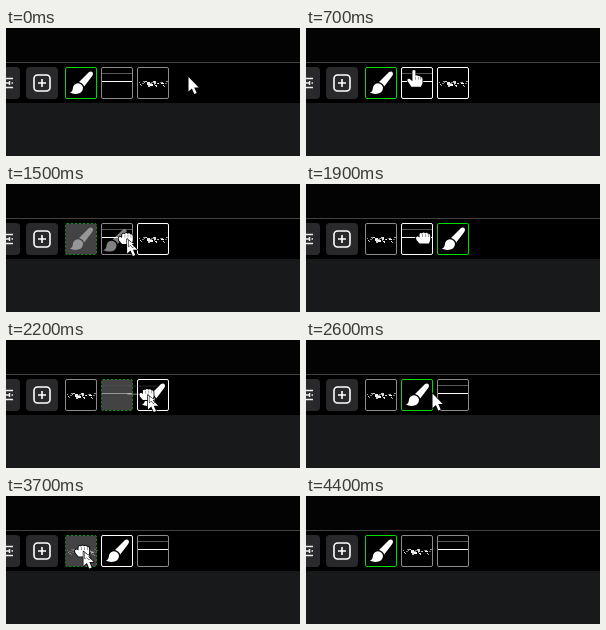
Recreate the animation shown at these times as an HTML page with a canvas. Size 294 px wide and 128 px high, loop 4800 ms.

```html
<!DOCTYPE html>
<html lang="en">
<head>
<meta charset="utf-8">
<title>Reordering tool tiles</title>
<style>
  html, body { margin: 0; width: 100%; height: 100%; overflow: hidden; background: #000; }
  canvas { display: block; width: 294px; height: 128px; }
</style>
</head>
<body>
<canvas id="stage" width="294" height="128"></canvas>
<script>
const ctx = document.getElementById('stage').getContext('2d');
const LOOP = 4800, STEP = 100;
const TOP = 39, SIZE = 32;
const slotX = i => 59 + 36 * i;

// Cursor path: time, x, y
const path = [
  [0, 182.5, 49], [200, 182.5, 49], [800, 93, 51], [1100, 80, 54], [1200, 80, 54],
  [1700, 146, 55], [1800, 146, 55], [1900, 117, 54], [2400, 156, 55], [2500, 156, 55],
  [2600, 126.5, 53.5], [3100, 92, 52], [3300, 76, 54], [3400, 76, 54], [3500, 75, 52],
  [3700, 76, 55], [4000, 112, 54], [4300, 148, 2], [4400, 150, -30]
];
const cursors = [
  [0, 'arrow'], [400, 'point'], [1000, 'drag'], [1700, 'point'], [1900, 'fist'],
  [2000, 'drag'], [2400, 'point'], [2600, 'arrow'], [2700, 'point'], [3200, 'fist'],
  [3300, 'drag'], [4000, 'point'], [4200, 'arrow'], [4400, 'none']
];
const orders = [
  [0, ['brush', 'lines', 'specks']], [1700, ['specks', 'lines', 'brush']],
  [2400, ['specks', 'brush', 'lines']], [4000, ['brush', 'specks', 'lines']]
];
// Slots with a bright outline
const hovers = [
  [0, ''], [400, '2'], [600, '12'], [900, '2'], [1400, '1'], [1500, '2'], [1700, ''],
  [1900, '1'], [2000, ''], [2200, '2'], [2600, ''], [3000, '0'], [3300, '1'], [4200, '']
];
// Dragged slot and the ghost's offset from the cursor
const drags = [
  [0, null], [1000, { slot: 0, dx: -27, dy: -14 }], [1700, null],
  [2000, { slot: 1, dx: -20, dy: -15 }], [2400, null],
  [3300, { slot: 0, dx: -15, dy: -15 }], [4000, null]
];

const at = (table, t) => table.filter(row => row[0] <= t).pop()[1];

function cursorAt(t) {
  const i = path.findIndex(p => p[0] > t);
  if (i < 0) return path[path.length - 1].slice(1);
  const [t0, x0, y0] = path[i - 1], [t1, x1, y1] = path[i];
  const k = (t - t0) / (t1 - t0);
  return [x0 + (x1 - x0) * k, y0 + (y1 - y0) * k];
}

function at2d(x, y, draw, alpha = 1) {
  ctx.save();
  ctx.translate(x, y);
  ctx.globalAlpha = alpha;
  draw();
  ctx.restore();
}

function box(x, y, w, h, color) {
  ctx.fillStyle = color;
  ctx.fillRect(x, y, w, h);
}

function rounded(x, y, w, h, r) {
  ctx.beginPath();
  ctx.roundRect(x, y, w, h, r);
}

function shape(d, fill, stroke, width = 1) {
  const p = new Path2D(d);
  if (stroke) {
    ctx.strokeStyle = stroke;
    ctx.lineWidth = width;
    ctx.lineJoin = 'round';
    ctx.stroke(p);
  }
  if (fill) {
    ctx.fillStyle = fill;
    ctx.fill(p);
  }
}

const art = {
  brush() {
    shape('M14 15 L23.5 5.6 Q26 3.8 27.5 5.2 Q28.8 6.8 27.2 9 L19.2 19.4 Q18 16.2 14 15Z', '#fff');
    shape('M13 16.2 Q17.4 17 18 20.6 Q17.8 25.4 13.5 26.6 Q9 27.8 4.8 25.6 Q7.6 24.8 7.8 21.5 Q8.4 16.4 13 16.2Z', '#fff');
  },
  lines() {
    box(1, 6, 30, 1, '#555');
    box(1, 14, 30, 1, '#fff');
  },
  specks() {
    let seed = 11;
    const rnd = () => (seed = (seed * 16807) % 2147483647) / 2147483647;
    for (let i = 0; i < 26; i++) {
      const x = 2 + i * 1.08;
      const y = 16 + 2 * Math.sin(i * 0.9) + rnd() * 2 - 1;
      const v = 100 + Math.floor(rnd() * 140);
      box(Math.round(x), Math.round(y), rnd() > 0.5 ? 2 : 1, 1, `rgb(${v},${v},${v})`);
    }
    box(10, 15, 3, 3, '#eee');
    box(13, 17, 3, 2, '#fff');
    box(17, 14, 2, 3, '#ddd');
    box(11, 18, 2, 2, '#ccc');
    box(24, 16, 3, 1, '#fff');
  }
};

function arrow(scale = 1) {
  ctx.save();
  ctx.scale(scale, scale);
  shape('M0 0V14.5L3.4 11.4L5.8 17L8.2 16L5.8 10.6H10.2Z', '#fff', '#000', 1.4);
  ctx.restore();
}

function fist() {
  shape('M-7 0Q-7 -2 -5 -1.5L-3.5 -.5V-4Q-2.5 -5.5 -1 -4.5Q.5 -6.5 2 -4.8Q3.8 -6 5 -4.2Q7.2 -4.5 7.2 -2V2L6 5.5H-3.5L-6.5 2Z', '#fff', '#000', 1.6);
  ctx.fillStyle = '#777';
  for (const x of [-1, 2, 5]) ctx.fillRect(x, -4, 0.7, 3);
}

const pointers = {
  none() {},
  arrow: () => arrow(),
  fist,
  drag() {
    fist();
    at2d(1.5, 0.5, () => arrow(1));
    shape('M3 2V8L4.8 6.4L7 9L8.2 8L6.2 5.4H8.5Z', '#fff', '#000', 1);
  },
  point() {
    shape('M-1.5 -8Q0 -9.5 1.5 -8V-3Q3 -4 4.2 -2.6Q5.8 -3.2 6.6 -1.6Q8.6 -1.6 8.6 .5V4L7 8H-2.5L-6.5 2Q-7 -.3 -4.5 0L-1.5 2.5Z', '#fff', '#000', 1.5);
    ctx.fillStyle = '#777';
    for (const x of [1.4, 4, 6.4]) ctx.fillRect(x, -2, 0.7, 3);
  }
};

function tile(i, name, hot, dragged, active) {
  at2d(slotX(i), TOP, () => {
    rounded(0.5, 0.5, SIZE - 1, SIZE - 1, 1.5);
    ctx.fillStyle = dragged ? '#434343' : '#000';
    ctx.fill();
    ctx.lineWidth = 1;
    ctx.strokeStyle = dragged ? '#178a17' : active ? '#00d800' : hot ? '#fff' : '#8c8c8c';
    ctx.setLineDash(dragged ? [2, 2] : []);
    ctx.stroke();
    ctx.setLineDash([]);
    ctx.globalAlpha = dragged ? 0.45 : 1;
    art[name]();
  });
}

function toolbar() {
  box(0, 0, 294, 34, '#030303');
  box(0, 34, 294, 1, '#414141');
  box(0, 35, 294, 40, '#000');
  box(0, 75, 294, 53, '#18191b');
  ctx.fillStyle = '#29292b';
  for (const x of [-18, 20]) {
    rounded(x, TOP, SIZE, SIZE, 4);
    ctx.fill();
  }
  shape('M0 50.5H7M0 55H3M5.5 55H7M0 59.5H7M3.5 53V57', null, '#eee', 1.5);
  rounded(28, 47, 16, 16, 3.5);
  ctx.strokeStyle = '#fff';
  ctx.lineWidth = 1.6;
  ctx.stroke();
  shape('M36 51V59M32 55H40', null, '#fff', 1.6);
}

function render(t) {
  const order = at(orders, t), hot = at(hovers, t), drag = at(drags, t);
  const [x, y] = cursorAt(t);
  toolbar();
  order.forEach((name, i) => {
    const over = hot.includes(i);
    const active = name === 'brush' && !(drag && over);
    tile(i, name, over, drag && drag.slot === i, active);
  });
  if (drag) at2d(x + drag.dx, y + drag.dy, art[order[drag.slot]], 0.5);
  at2d(x, y, pointers[at(cursors, t)]);
}

const start = performance.now();
function tick() {
  const t = (performance.now() - start) % LOOP;
  render(Math.floor(t / STEP) * STEP);
  requestAnimationFrame(tick);
}
tick();
</script>
</body>
</html>
```
